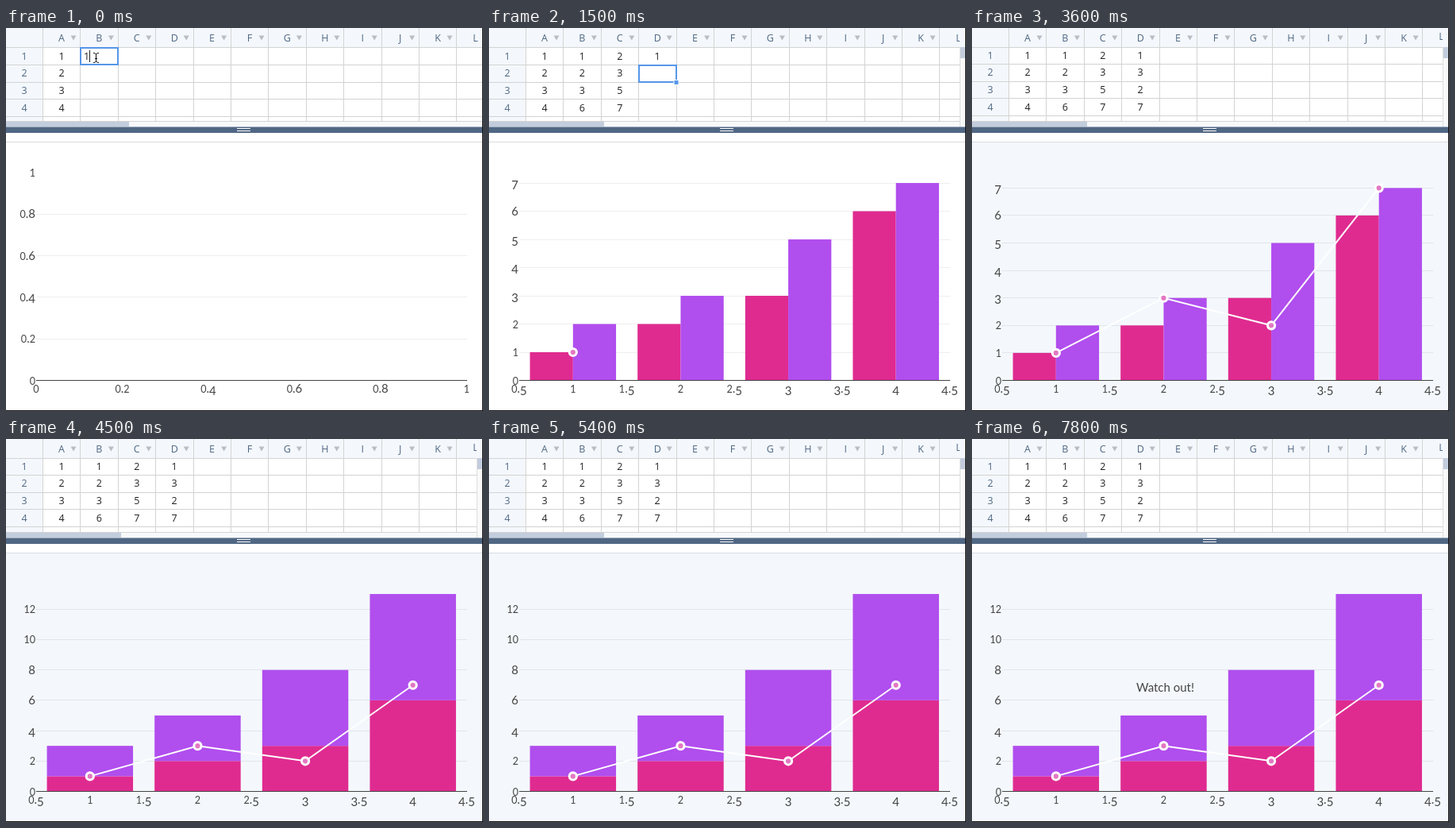
An HTML page for the animation above (8 s loop, 601 by 482 pixels).

```html
<!DOCTYPE html>
<html lang="en">
<head>
<meta charset="utf-8">
<title>Spreadsheet chart</title>
<style>
  html, body { margin: 0; width: 100%; height: 100%; overflow: hidden; background: #fff; }
  svg { display: block; width: 601px; height: 482px; }
  .sheet { font: 12.5px "Open Sans", sans-serif; text-anchor: middle; }
  .chart { font: 15px Lato, sans-serif; fill: #444; }
  .small { font-size: 12.6px; }
</style>
</head>
<body>
<svg id="stage" viewBox="0 0 601 482"></svg>
<script>
const LOOP = 8000, STEP = 300;
const PALE = '#f4f8fc', SLATE = '#506784', LINE = '#d3d3d3', BLUE = '#5696e8';
const LEFT = 38, RIGHT = 580.5, TOP = 182, BASE = 443.5, PLOT = BASE - TOP;
const B = [1, 2, 3, 6], C = [2, 3, 5, 7], D = [1, 3, 2, 7];
const NOTE = 'Watch out!';
const stage = document.getElementById('stage');

const rect = (x, y, w, h, fill, more = '') =>
  `<rect x="${x}" y="${y}" width="${w}" height="${h}" fill="${fill}" ${more}/>`;
const line = (x1, y1, x2, y2, color, width = 1) =>
  `<path d="M${x1} ${y1}L${x2} ${y2}" stroke="${color}" stroke-width="${width}"/>`;
const text = (x, y, s, more = '') => `<text x="${x}" y="${y}" ${more}>${s}</text>`;
const colX = i => Math.round(46 + 47.4 * i) + .5;
const round1 = v => Math.round(v * 10) / 10;

// Old-style figures: 0-2 are short, 3 4 5 7 9 hang below the baseline.
function figures(s) {
  let drop = 0;
  return [...String(s)].map(c => {
    const next = '34579'.includes(c) ? 2.5 : 0;
    const cls = '012'.includes(c) ? ' class="small"' : '';
    const span = `<tspan dy="${next - drop}"${cls}>${c}</tspan>`;
    drop = next;
    return span;
  }).join('');
}

function stateAt(n) {
  return {
    n,
    b: n ? B : [],
    c: C.slice(0, [0, 0, 2, 3][n] ?? 4),
    d: D.slice(0, n < 5 ? 0 : n < 7 ? n - 4 : 4),
    cell: [[1, 0], [2, 0], [2, 2], [2, 3], [3, 0], [3, 1], [3, 2]][n],
    plotFill: n >= 9,
    paperFill: n >= 11,
    strongGrid: n >= 12,
    stacked: n >= 15,
    colors: n === 16 || n === 17 ? ['#38329b', '#147dd9'] : ['#df2b90', '#b14eee'],
    note: n < 22 ? '' : NOTE.slice(0, [1, 3, 5, 8, 10][n - 22])
  };
}

function sheet(s) {
  const shift = s.n >= 7 ? -1 : 0;
  const rowY = i => Math.round(24 + 21.75 * i) + .5 + (i ? shift : 0);
  let out = rect(0, 0, 601, 25, PALE) + rect(0, 25, 46, 93, PALE);
  for (let i = 0; i < 12; i++) out += line(colX(i), 0, colX(i), 117.5, LINE);
  for (let i = 0; i < 5; i++) out += line(0, rowY(i), 600, rowY(i), LINE);
  out += line(0, 117.5, 600, 117.5, LINE);

  for (let i = 0; i < 12; i++) {
    const x = 70 + 47.4 * i;
    const y = i === 11 ? 16.5 + shift * 2 : 16.5;
    out += text(x, y, 'ABCDEFGHIJKL'[i], `fill="${SLATE}"`);
    if (i < 11) out += `<path d="M${x + 11.5} 9.5h7l-3.5 6z" fill="#b9bec4"/>`;
  }
  const columns = [[1, 2, 3, 4], s.b, s.c, s.d];
  for (let r = 0; r < 4; r++) {
    const y = 39.5 + 21.75 * r + shift;
    out += text(23, y, r + 1, `fill="${SLATE}"`);
    columns.forEach((col, i) => {
      if (col[r]) out += text(70 + 47.4 * i, y, col[r], 'fill="#222"');
    });
  }

  if (s.cell) {
    const [c, r] = s.cell, x = colX(c), y = rowY(r), x2 = colX(c + 1), y2 = rowY(r + 1);
    out += rect(x + .5, y + .5, x2 - x - 1, y2 - y - 1, '#fff', `stroke="${BLUE}" stroke-width="2"`);
    if (s.n) out += rect(x2 - 3.5, y2 - 3, 6, 6, BLUE, 'stroke="#fff"');
    else {
      out += text(101.5, 39.5, 1, 'fill="#222"') + line(105.5, 28, 105.5, 43, '#222');
      out += '<path d="M110 31.5q3 0 3.5 1.5q.5-1.5 3.5-1.5M113.5 32.5v10M110 43.5q3 0 3.5-1.5q.5 1.5 3.5 1.5M112 38.5h3" fill="none" stroke="#111"/>';
    }
  }

  out += rect(0, 118, 601, 7, '#f8f9fa') + rect(0, 118, s.n ? 145 : 155, 6, '#c2cddd');
  if (s.n) {
    out += rect(593, 0, 8, 24, PALE) + rect(593, 24, 8, 94, '#fafafa');
    out += line(593.5, 24, 593.5, 125, '#ddd') + rect(594, 24, 6, 14, '#c2cddd');
  }
  out += rect(0, 124.5, 601, 7.5, SLATE);
  out += line(291, 126.5, 308, 126.5, '#fff') + line(291, 129.5, 308, 129.5, '#fff');
  return `<g class="sheet">${out}</g>`;
}

function chart(s) {
  const empty = !s.b.length;
  const sums = s.b.map((v, i) => v + (s.c[i] || 0));
  const peak = Math.max(...(s.stacked ? sums : [...s.b, ...s.c]));
  const limit = empty ? 1 : !s.stacked && s.d.length === 4 ? 7.56 : peak / .95;
  const x0 = empty ? 0 : .5, x1 = empty ? 1 : 4.5;
  const px = v => LEFT + (v - x0) / (x1 - x0) * (RIGHT - LEFT);
  const py = v => BASE - v / limit * PLOT;
  const yStep = empty ? .2 : limit > 10 ? 2 : 1;
  const xStep = empty ? .2 : .5;
  let out = '';

  if (s.paperFill) out += rect(0, 144, 601, 338, PALE);
  else if (s.plotFill) out += rect(LEFT, TOP, 543, PLOT, PALE);
  out += line(0, 143.5, 601, 143.5, '#d9dcdf');

  const grid = s.strongGrid ? '#e1e6ec' : '#eee';
  for (let v = 0; v <= limit + .01; v += yStep) {
    const y = py(v);
    if (v && y > TOP + 1) out += line(LEFT, Math.floor(y) + .5, 581, Math.floor(y) + .5, grid);
    out += text(37, y + 5, figures(round1(v)), 'text-anchor="end"');
  }

  const bar = (a, b, low, high, color) =>
    rect(px(a), py(high), px(b) - px(a), py(low) - py(high), color);
  s.b.forEach((v, i) => {
    const x = i + 1, c = s.c[i] || 0, wide = s.stacked || !s.c.length;
    out += bar(x - .4, wide ? x + .4 : x, 0, v, s.colors[0]);
    if (c) out += s.stacked ? bar(x - .4, x + .4, v, v + c, s.colors[1])
                            : bar(x, x + .4, 0, c, s.colors[1]);
  });

  out += line(LEFT, BASE, 581, BASE, '#444');
  for (let v = x0; v <= x1 + .01; v += xStep)
    out += text(px(v), 459, figures(round1(v)), 'text-anchor="middle"');

  const points = s.d.map((v, i) => [px(i + 1), py(v)]);
  out += `<polyline points="${points.join(' ')}" fill="none" stroke="#fff" stroke-width="2"/>`;
  for (const [x, y] of points)
    out += `<circle cx="${x}" cy="${y}" r="4.6" fill="#e377c2" stroke="#fff" stroke-width="3"/>`;

  if (s.note) out += text(243.5, 318, s.note, 'text-anchor="middle"');
  return `<g class="chart">${out}</g>`;
}

let shown = -1;
function draw(now) {
  const n = Math.floor(now % LOOP / STEP);
  if (n !== shown) {
    shown = n;
    const s = stateAt(n);
    stage.innerHTML = rect(0, 0, 601, 482, '#fff') + sheet(s) + chart(s) +
      line(600.5, 0, 600.5, 482, '#111') + line(0, 481.5, 601, 481.5, '#111');
  }
  requestAnimationFrame(draw);
}
const start = performance.now();
draw(0);
requestAnimationFrame(function run(now) {
  draw(Math.max(0, now - start));
});
</script>
</body>
</html>
```
